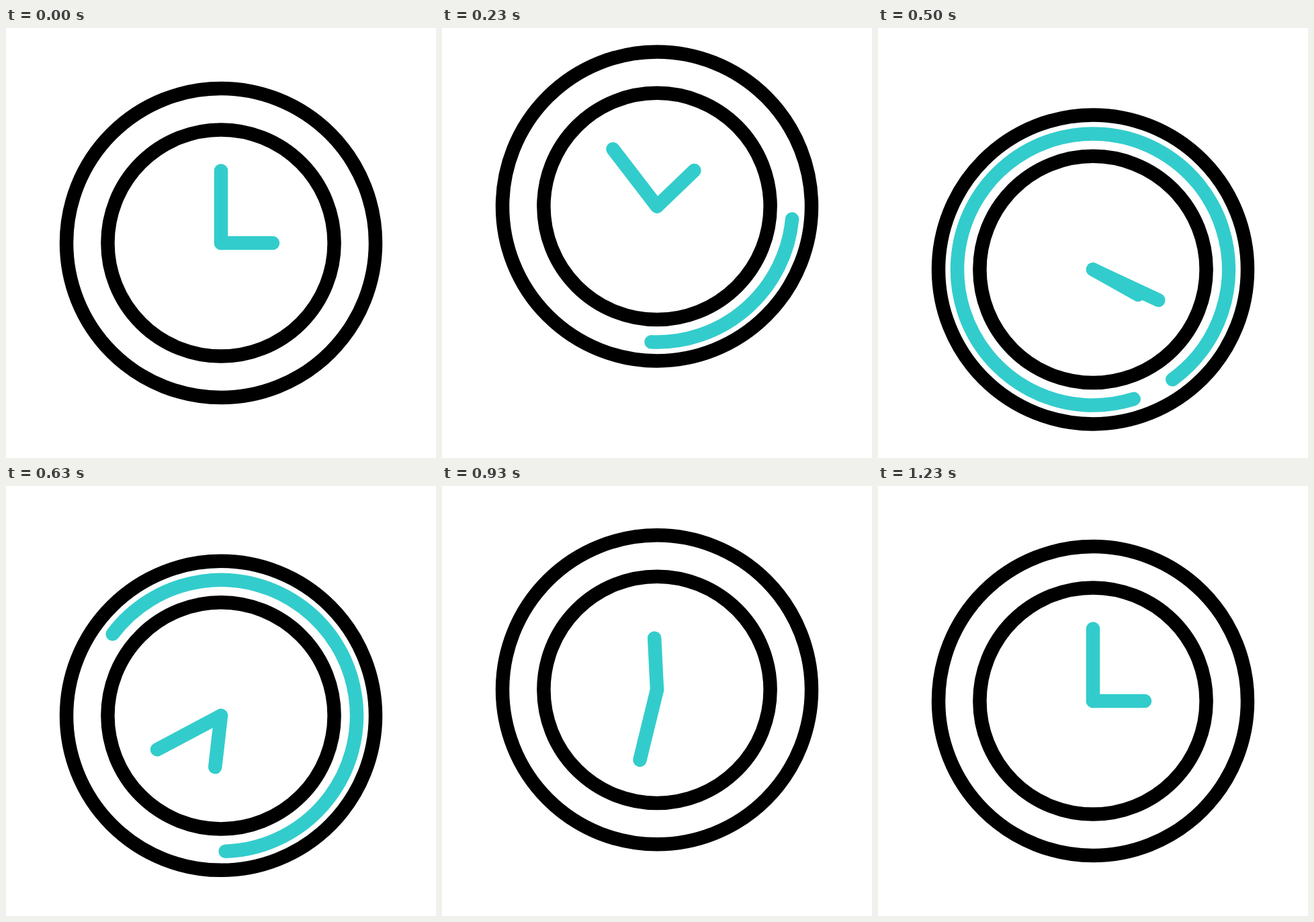
Animation, 640 px wide and 640 px high, one loop 1670 ms. Source, as an HTML page:

```html
<!DOCTYPE html>
<html lang="en">
<head>
<meta charset="utf-8">
<title>Clock</title>
<style>
  html, body { margin: 0; width: 100%; height: 100%; overflow: hidden; background: #fff; }
  svg { display: block; width: 100vw; height: 100vh; }
  g { fill: none; stroke: #33cccc; stroke-width: 20.5; stroke-linecap: round; }
  .ring { stroke: #000; }
</style>
</head>
<body>
<svg viewBox="0 0 640 640">
  <g id="clock">
    <circle class="ring" r="230"/>
    <circle class="ring" r="168.6"/>
    <circle id="arc" r="202" pathLength="360" visibility="hidden"/>
    <path id="hour" d="M0 0V-77"/>
    <path id="minute" d="M0 0V-107.5"/>
  </g>
</svg>
<script>
const LOOP = 1670, FPS = 30;
const [clock, arc, hour, minute] =
  ['clock', 'arc', 'hour', 'minute'].map(id => document.getElementById(id));

// Cubic Bezier easing with control points (x1, 0) and (x2, 1)
const bezier = (x1, x2) => u => {
  let lo = 0, hi = 1;
  for (let i = 0; i < 24; i++) {
    const s = (lo + hi) / 2, r = 1 - s;
    const x = 3 * s * r * r * x1 + 3 * s * s * r * x2 + s * s * s;
    if (x < u) lo = s; else hi = s;
  }
  return lo * lo * (3 - 2 * lo);
};
const easeInOut = bezier(0.42, 0.58);
const sweep = bezier(0.36, 0.70);
const smooth = u => u * u * (3 - 2 * u);

// Value at time f along keys of [time, value, easing into the key]
function track(f, keys) {
  if (f <= keys[0][0]) return keys[0][1];
  for (let i = 1; i < keys.length; i++) {
    const [a, from] = keys[i - 1], [b, to, ease] = keys[i];
    if (f < b) return from + (to - from) * ease((f - a) / (b - a));
  }
  return keys[keys.length - 1][1];
}

const bounce = [[0, 320], [8, 263.7, easeInOut], [16, 362.5, easeInOut],
                [24, 292, easeInOut], [33, 320, easeInOut]];
const minuteTurn = [[0, 0], [5, -45, easeInOut], [37, 720, sweep]];
const hourTurn = [[0, 90], [6, 45, easeInOut], [37, 450, sweep]];
const arcTurn = [[4, 90], [29, 226, smooth]];
const arcHead = [[3, 0], [15.5, 360, smooth]];
const arcTail = [[13.1, 0], [27.7, 360, smooth]];

const rotate = (el, deg) => el.setAttribute('transform', `rotate(${deg})`);

function draw(f) {
  clock.setAttribute('transform', `translate(320 ${track(f, bounce)})`);
  rotate(minute, track(f, minuteTurn));
  rotate(hour, track(f, hourTurn));

  const tail = track(f, arcTail), length = track(f, arcHead) - tail;
  arc.setAttribute('visibility', length > 0 ? 'visible' : 'hidden');
  arc.setAttribute('stroke-dasharray', `${length} 360`);
  rotate(arc, track(f, arcTurn) + tail - 90);
}

// The motion is held at 30 steps per second
const start = performance.now();
function tick() {
  const t = (performance.now() - start) % LOOP;
  draw(Math.floor(t * FPS / 1000 + 0.11));
  requestAnimationFrame(tick);
}
tick();
</script>
</body>
</html>
```
